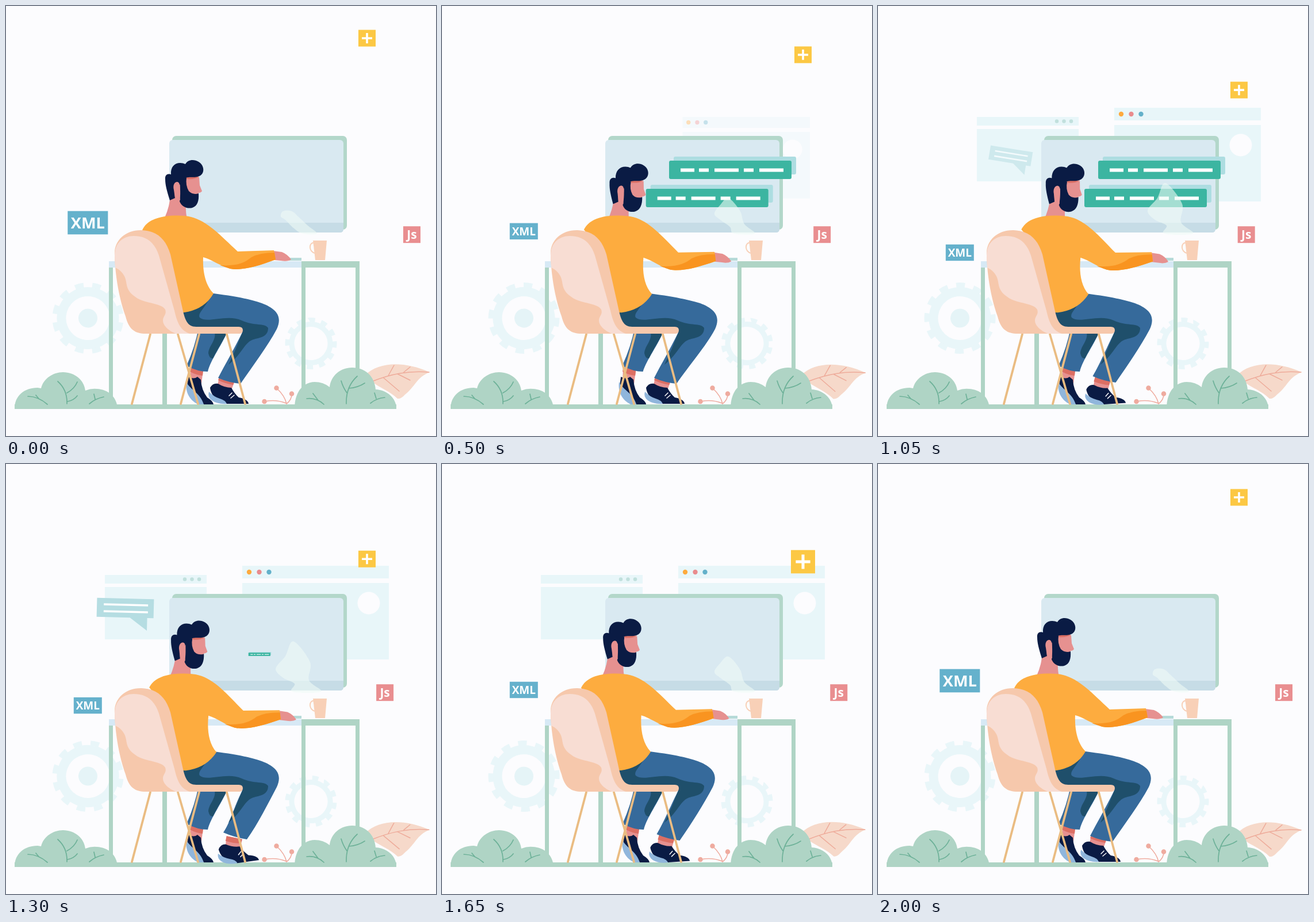
These frames come from a looping animation (748x748 px, 2.05 s). An HTML page:

```html
<!DOCTYPE html>
<html lang="en">
<head>
<meta charset="utf-8">
<title>Developer at a desk</title>
<style>
html, body { margin: 0; width: 100%; height: 100%; overflow: hidden; background: #fcfcfe; }
svg { display: block; width: 100vw; height: 100vh; }
text { font: 700 19px "Open Sans", "Noto Sans", sans-serif; fill: #fff; text-anchor: middle; }
.line { fill: none; stroke-linecap: round; stroke-linejoin: round; }
.skin { fill: #e69190; }
.navy { fill: #0a1b44; }
.red { fill: #dc6f64; }
.blue { fill: #366a9b; }
.dark { fill: #1f4f6b; }
.sole { fill: #90b6dc; }
.green { fill: #afd4c5; }
.pale { fill: #e8f6f9; }
</style>
</head>
<body>
<svg viewBox="0 0 748 748">
  <defs>
    <g id="bar">
      <rect x="8" y="-7" width="213" height="31" rx="3" fill="#addde1"/>
      <rect width="213" height="32" rx="3" fill="#3cb5a1"/>
      <path d="M20 16.5h24m8 0h17m10 0h42m9 0h17m10 0h42" stroke="#fff" stroke-width="6"/>
    </g>
  </defs>

  <g fill="none" stroke="#e9f6f9">
    <g id="gear1">
      <circle r="46" stroke-width="16"/>
      <circle r="57.5" stroke-width="9" pathLength="24" stroke-dasharray="1"/>
      <circle r="16.5" fill="#e5f4f7" stroke="none"/>
    </g>
    <g id="gear2">
      <circle r="33.5" stroke-width="9"/>
      <circle r="41" stroke-width="8" pathLength="24" stroke-dasharray="1"/>
    </g>
  </g>

  <g id="winR">
    <path class="pale" d="M411 177H666V199H411ZM411 207H666V340H411Z"/>
    <circle cx="631" cy="242" r="19.5" fill="#fcfcfe"/>
    <circle cx="423" cy="188" r="4.2" fill="#fdaa3e"/>
    <circle cx="440.5" cy="188" r="4.2" fill="#e98b8d"/>
    <circle cx="457.5" cy="188" r="4.2" fill="#63b1ca"/>
  </g>
  <g id="winL">
    <path class="pale" d="M172 193H349V208H172ZM172 214H349V305H172Z"/>
    <path class="line" d="M311 200.5h0M323.5 200.5h0M336 200.5h0" stroke="#c1e0dd" stroke-width="6.5"/>
  </g>
  <g id="bubble">
    <path d="M-50 -17H49V16H38V38L8 16H-50Z" fill="#b5dde2"/>
    <path d="M-38 -6H39M-38 6H39" stroke="#fff" stroke-width="3.5"/>
  </g>

  <rect x="289" y="226" width="304" height="163" rx="7" fill="#b3d7ca"/>
  <rect x="284" y="233" width="303" height="161" rx="6" fill="#d9e9f1"/>
  <path d="M284 377H587V388Q587 394 581 394H290Q284 394 284 388Z" fill="#c6dce6"/>
  <use id="bar1" href="#bar"/>
  <use id="bar2" href="#bar"/>
  <path id="steam" fill="#effbf7" opacity=".58"/>

  <path class="green" d="M179 455H186V693H179ZM272 560H280V693H272ZM514 444H615V693H608V455H521V693H514Z"/>
  <path d="M179 444H514V455H179Z" fill="#d7e9f5"/>
  <path d="M490 438H514V443H490Z" fill="#b6dad8"/>
  <path d="M534 408H558L555 442H538Z" fill="#f8d0b7"/>
  <path class="line" d="M537 412C526 410 526 428 538 430" stroke="#f8d0b7" stroke-width="2"/>

  <g id="leaf">
    <path d="M625 642C648 619 692 617 737 637C714 646 713 661 694 676Q687 684 681 683C668 670 650 664 637 654Z" fill="#f6d9ca"/>
    <path class="line" d="M637 653C670 640 700 634 736 637M665 643L675 625M692 637L703 628M657 647L684 670M681 640L703 651" stroke="#eeab9a" stroke-width="1.5"/>
  </g>
  <path class="line" d="M488 692Q485 678 471 665M487 691Q470 684 450 688M488 692Q497 685 497 675" stroke="#efab9f" stroke-width="1.6"/>
  <path class="line" d="M449.5 688h0M470.5 664.5h0M497 674.5h0" stroke="#efab9f" stroke-width="8.5"/>
  <path class="green" d="M15 693H679V701H15Z"/>

  <g id="footB">
    <path class="skin" d="M321 628L343 634L340 656L320 650Z"/>
    <path class="red" d="M321 628L343 634L342 643Q331 642 320 636Z"/>
    <path class="navy" d="M317 645Q327 650 333 645L339 650Q340 668 350 681Q360 687 361 693H344L315 660Z"/>
    <path class="sole" d="M314 653C316 665 338 672 344 693H334C320 686 311 672 314 653Z"/>
  </g>
  <path id="legB" class="blue"/>
  <path class="dark" d="M362 565C368 580 353 590 352 604Q354 614 360 613C368 595 380 580 388 560Z"/>
  <g id="footF">
    <path class="skin" d="M372 643L398 652L391 671L367 662Z"/>
    <path class="red" d="M372 643L398 652L395 659Q382 657 369 651Z"/>
    <path class="navy" d="M355 664Q360 655 369 657Q380 664 392 664Q398 675 405 681Q421 684 422 692H384C370 690 357 680 355 664Z"/>
    <path class="sole" d="M353 671Q362 680 372 683Q382 686 384 692Q368 693 358 686Q350 680 353 671Z"/>
    <path class="line" d="M388 678L393 673M391 682L397 677" stroke="#fff" stroke-width="1.5"/>
  </g>
  <path id="legF" class="blue"/>
  <path class="dark" d="M300 535C325 531 340 522 352 512C345 526 333 535 337 542C350 553 385 535 410 547C432 557 450 551 456 560C456 578 437 577 428 581C414 587 410 606 387 624Q400 597 411 568L310 565Z"/>

  <g id="head">
    <path class="skin" d="M285 330L294 310H313V298H336L337 312L341 322Q339 325 335 325L333 340L313 346Q312 358 316 376L272 376Q282 358 285 338Z"/>
    <path class="red" d="M313 297H336Q328 302 315 301Z"/>
    <path class="navy" d="M302 299C303 318 304 328 302 340C306 350 316 353 324 351C333 348 336 339 335 326Q325 329 318 322Q312 312 314 299Z"/>
    <path class="navy" d="M285 338C280 322 277 311 277 302C276 293 282 291 287 293C286 280 293 273 303 273Q308 273 312 275C316 267 327 266 335 271C345 277 346 290 338 295C330 300 320 296 313 299L303 310L293 322L294 334Z"/>
    <path class="skin" d="M292 320C289 308 297 303 301 308C304 314 301 323 303 338L294 334Z"/>
  </g>
  <g id="body">
    <path class="skin" d="M465 426L480 428Q490 432 496 441Q490 445 478 443L467 442Z"/>
    <path d="M276 366C292 364 310 364 322 367C350 374 372 398 403 427L466 425L469 441C440 452 410 461 390 457C372 452 358 441 343 437C342 460 346 485 361 500Q345 528 310 533H285L255 410L237 390C243 376 258 369 276 366Z" fill="#fdac3f"/>
    <path d="M372 451C400 453 415 447 427 437Q442 429 467 429L469 441C440 452 410 461 390 457Z" fill="#f99420"/>
  </g>

  <path class="line" d="M251 571L219 692M299 571L334 692M336 571L304 692M384 571L416 692" stroke="#eabc82" stroke-width="3.8"/>
  <path d="M189 434C187 408 208 389 236 390C262 391 278 405 286 432L306 522C311 546 315 558 331 558H405Q412 558 412 564T405 570H240C222 569 213 560 208 540C197 510 190 470 189 434Z" fill="#f6c8ac"/>
  <path d="M189 434C189 412 204 400 222 400C245 400 259 412 266 434L293 530C298 552 304 565 320 570H296C285 566 273 557 273 547C273 539 280 537 277 528C270 516 240 518 225 506C206 493 212 482 206 470Q201 460 190 455Z" fill="#f8ddd3"/>

  <path class="green" d="M15 700C15 678 32 664 55 664L61 665C65 648 82 637 99 637C120 637 136 651 138 669Q148 665 158 666C178 667 193 680 194 700ZM502 700C502 670 518 654 537 654Q552 654 563 663C565 643 582 629 602 629C624 629 641 643 643 667C663 668 679 682 679 700Z"/>
  <path class="line" d="M106 692Q107 668 90 653M106 673Q119 666 124 654M107 688Q118 686 124 678M38 679Q56 679 72 693M57 683L52 677M145 692Q155 683 170 680M155 684L153 675
    M592 692Q591 662 611 644M593 673Q586 663 583 652M596 665Q612 664 624 656M523 683Q540 681 553 693M543 686L534 674M634 691Q645 682 659 681M644 683L641 673" stroke="#6db198" stroke-width="1.7"/>

  <g id="xml"><rect x="-24.5" y="-14.2" width="49" height="28.4" fill="#65b1cc"/><text y="6.7">XML</text></g>
  <g id="js"><rect x="-15" y="-14.5" width="30" height="29" fill="#e98e90"/><text y="7.3" style="font-size:21px">Js</text></g>
  <g id="plus"><rect x="-15" y="-14.5" width="30" height="29" fill="#fcc844"/><path d="M-9 0H9M0 -9V9" stroke="#fff" stroke-width="3.6"/></g>
</svg>
<script>
const LOOP = 2050, STEP = 50;
// Outline of the steam, settled and risen.
const LOW = [[516, 396], [500, 386], [486, 372], [478, 366], [482, 357], [497, 357], [509, 367], [525, 382], [541, 396]];
const HIGH = [[498, 396], [502, 382], [482, 372], [469, 356], [486, 334], [500, 308], [529, 344], [527, 376], [548, 396]];

const set = (id, attr, value) => document.getElementById(id).setAttribute(attr, value);
const mix = (a, b, k) => a + (b - a) * k;

function place(id, x, y, scale = 1, turn = 0) {
  set(id, 'transform', `translate(${x} ${y}) rotate(${turn}) scale(${scale})`);
}

// Closed curve through all points.
function smooth(points) {
  const n = points.length, at = i => points[(i + n) % n];
  const curve = points.map((b, i) => {
    const a = at(i - 1), c = at(i + 1), d = at(i + 2);
    return `C${b.map((v, k) => v + (c[k] - a[k]) / 6)} ${c.map((v, k) => v - (d[k] - b[k]) / 6)} ${c}`;
  });
  return `M${points[0]}${curve.join('')}Z`;
}

function showWindow(id, shown) {
  set(id, 'transform', `translate(467 300) scale(${mix(.8, 1, shown)}) translate(-467 -300)`);
  set(id, 'opacity', shown);
}

function showBar(id, x, y, scale) {
  set(id, 'transform', `translate(${x} ${y}) scale(${scale}) translate(-110.5 -12.5)`);
}

function draw(t) {
  const rise = (from, to) => {
    const u = Math.min(1, Math.max(0, (t - from) / (to - from)));
    return u * u * (3 - 2 * u);
  };
  // Eases from 0 to 1 over a..b and back over c..d.
  const swell = (a, b, c, d) => rise(a, b) - rise(c, d);
  const turn = t / LOOP;

  place('gear1', 142.5, 543, 1, 7.5 + 90 * turn);
  place('gear2', 530.5, 587, 1, 60 * turn - 5);
  set('leaf', 'transform', `rotate(${.6 * Math.sin(2 * Math.PI * turn)} 637 653)`);

  showWindow('winR', swell(400, 650, 1700, 1900));
  showWindow('winL', swell(600, 900, 1700, 1900));

  const pop = swell(900, 1200, 1420, 1580);
  place('bubble', mix(254, 208, pop), mix(271, 251, pop), mix(.5, 1, pop), mix(17, 1.5, pop));
  set('bubble', 'opacity', pop);

  showBar('bar1', 505.5 - 12 * rise(800, 1050), 281.5, swell(50, 220, 1060, 1230));
  showBar('bar2', 459.5 + 10 * rise(320, 650) - 28 * rise(1070, 1300), 330.5, swell(100, 280, 1070, 1385));

  const steam = swell(0, 1050, 1250, 2000);
  set('steam', 'd', smooth(LOW.map((p, i) => p.map((v, k) => mix(v, HIGH[i][k], steam)))));

  // The upper body shears forward over the hips; the head also dips.
  const lean = swell(0, 700, 1250, 1950), nod = swell(0, 700, 700, 2000);
  const shear = (k, tilt, drop) => `translate(300 ${580 + drop}) matrix(1 ${tilt} ${-.065 * k} 1 0 0) translate(-300 -580)`;
  set('body', 'transform', shear(lean, .02 * lean, 0));
  set('head', 'transform', shear(nod, 0, 8 * nod));

  const knee = 5 * swell(0, 700, 700, 1300);
  const back = -9 * swell(200, 700, 700, 1050);
  const step = swell(800, 1300, 1300, 2000);
  set('legF', 'd', `M300 520L361 500C400 505 425 510 ${445 + knee} 517C${471 + knee} 527 ${481 + knee} 540 ${471 + knee} 562
    C${455 + knee} 592 ${430 + 9 * step} 625 ${408 + 11 * step} ${657 - 4 * step}Q${387 + 9 * step} ${655 - 6 * step} ${369 + 9 * step} ${647 - 6 * step}
    C${382 + 9 * step} 622 395 600 411 568L310 565Z`);
  set('legB', 'd', `M335 560Q329 592 ${314 + back * .1} 626Q333 636 ${351 + back * .25} 636C356 615 376 590 388 560Z`);
  place('footB', back, 0);
  set('footF', 'transform', `translate(${18 * step} 0) rotate(${-8 * step} 400 690)`);

  place('xml', 142.3, 377 + 52 * swell(200, 1050, 1050, 2000), 1.43 - .43 * swell(100, 270, 1700, 1950));
  place('js', 706 - 71 * swell(0, 850, 850, 2000), 397.7);
  place('plus', 628, 56 + 114 * swell(20, 1480, 1650, 2030), 1 + .4 * swell(1400, 1650, 1650, 1850));
}

function frame(now) {
  draw(Math.floor(now % LOOP / STEP) * STEP);
  requestAnimationFrame(frame);
}
draw(0);
requestAnimationFrame(frame);
</script>
</body>
</html>
```
